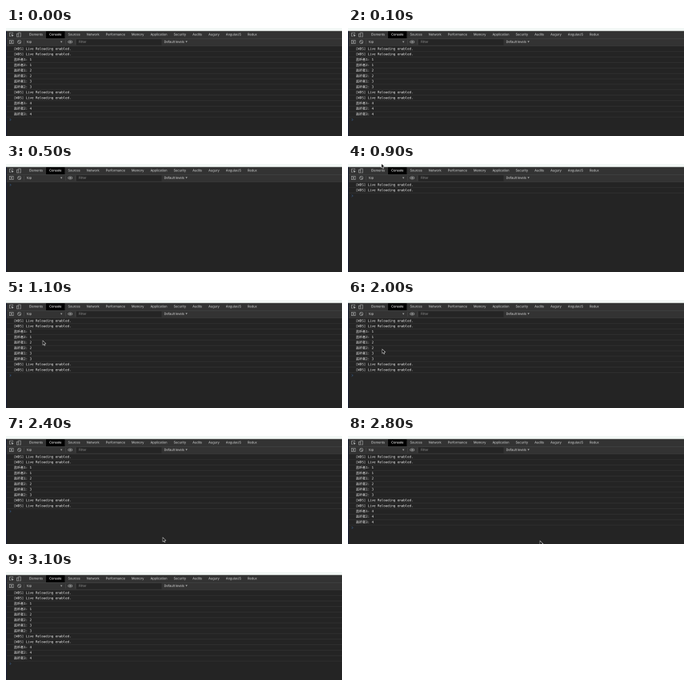
These frames come from a looping animation (420 px wide and 136 px high, 3300 ms). An HTML page with a canvas:

```html
<!DOCTYPE html>
<html lang="zh">
<head>
<meta charset="utf-8">
<title>Console</title>
<style>
  html, body { margin: 0; width: 100%; height: 100%; overflow: hidden; background: #242424; }
  canvas { display: block; width: 420px; height: 136px; }
</style>
</head>
<body>
<canvas id="stage"></canvas>
<script>
const W = 420, H = 136, LOOP = 3300, STEP = 100;
const CLEAR_AT = 500, REFILL_AT = 2700;
const ROW_TOP = 22.9, ROW_H = 6.86;
const UI = '500 3.9px Inter, "Liberation Sans", sans-serif';
const MONO = '4.12px "DejaVu Sans Mono", "Noto Sans CJK SC", "Noto Sans CJK", monospace';
const GRAY = '#adafaf';

// The scene is painted oversized and scaled down, so small text stays smooth.
const OVERSAMPLE = 4;
const ratio = window.devicePixelRatio || 1;
const canvas = document.getElementById('stage');
const screen2d = canvas.getContext('2d');
canvas.width = W * ratio;
canvas.height = H * ratio;
const buffer = document.createElement('canvas');
buffer.width = W * ratio * OVERSAMPLE;
buffer.height = H * ratio * OVERSAMPLE;
const ctx = buffer.getContext('2d');
ctx.scale(ratio * OVERSAMPLE, ratio * OVERSAMPLE);
ctx.textBaseline = 'middle';

const tabs = ['Elements', 'Console', 'Sources', 'Network', 'Performance', 'Memory',
  'Application', 'Security', 'Audits', 'Augury', 'AngularJS', 'Redux'];

const log = [];
const print = (time, string) => log.push({ time, string });
const printHeard = (time, listeners, value) => {
  for (let i = 1; i <= listeners; i++) print(time, `监听者${i}: ${value}`);
};
const printReload = time => print(time, '[WDS] Live Reloading enabled.');
printReload(700);
printReload(800);
for (let value = 1; value <= 3; value++) printHeard(1000, 2, value);
printReload(1000);
printReload(1100);
printHeard(REFILL_AT, 3, 4);

// The pointer glides during `move` and is visible during `show`.
const glides = [
  { show: [900, 1900], move: [900, 1000], from: [41.8, -0.5], to: [46, 51.2] },
  { show: [1900, 2400], move: [1900, 2200], from: [46, 51.2], to: [36.6, 83.4] },
  { show: [2400, 2500], move: [2400, 2500], from: [196, 127.7], to: [196, 127.7] },
  { show: [2800, 3100], move: [2800, 3000], from: [240, 132], to: [391, 129] }
];

function rect(x, y, w, h, color) {
  ctx.fillStyle = color;
  ctx.fillRect(x, y, w, h);
}

function text(string, x, y, color, font = UI) {
  ctx.font = font;
  ctx.fillStyle = color;
  ctx.fillText(string, x, y);
}

function shape(points, { fill, stroke, width = 0.6, closed = true }) {
  ctx.beginPath();
  points.forEach(([x, y]) => ctx.lineTo(x, y));
  if (closed) ctx.closePath();
  paint(fill, stroke, width);
}

function ellipse(x, y, rx, ry, { fill, stroke }) {
  ctx.beginPath();
  ctx.ellipse(x, y, rx, ry, 0, 0, Math.PI * 2);
  paint(fill, stroke, 0.6);
}

function paint(fill, stroke, width) {
  if (fill) {
    ctx.fillStyle = fill;
    ctx.fill();
  }
  if (stroke) {
    ctx.strokeStyle = stroke;
    ctx.lineWidth = width;
    ctx.stroke();
  }
}

function box(x, y, w, h) {
  shape([[x, y], [x + w, y], [x + w, y + h], [x, y + h]], { stroke: GRAY });
}

function dropArrow(x, y) {
  shape([[x, y], [x + 2.4, y], [x + 1.2, y + 2]], { fill: GRAY });
}

function drawTabs() {
  const first = 29, last = 302;
  ctx.font = UI;
  const widths = tabs.map(label => ctx.measureText(label).width);
  const used = widths.slice(0, -1).reduce((sum, width) => sum + width);
  const gap = (last - first - used) / (tabs.length - 1);
  let x = first;
  tabs.forEach((label, i) => {
    const selected = label === 'Console';
    if (selected) rect(x - gap / 2, 4, widths[i] + gap, 9, '#000');
    text(label, x, 8.3, selected ? '#fff' : '#c4c6c6');
    x += widths[i] + gap;
  });
}

function drawIcons() {
  const open = { stroke: GRAY, closed: false };
  shape([[8.6, 7.2], [8.6, 6.1], [4.6, 6.1], [4.6, 10.2], [6, 10.2]], open);
  shape([[6.4, 7.7], [9.6, 9.1], [7.6, 11]], { fill: GRAY });
  box(13.6, 7.2, 2.2, 3.8);
  shape([[14.8, 6], [18.2, 6], [18.2, 11], [16.8, 11]], open);

  box(4.5, 15.3, 4.6, 4.4);
  shape([[6, 16.3], [8.2, 17.5], [6, 18.7]], { fill: GRAY });
  ellipse(16.7, 17.5, 2.1, 2.1, { stroke: GRAY });
  shape([[15.3, 16.1], [18.1, 18.9]], open);
  ellipse(80.3, 17.5, 2.6, 1.6, { stroke: GRAY });
  ellipse(80.3, 17.5, 0.9, 0.9, { fill: GRAY });
}

function drawToolbar() {
  rect(0, 0, W, 3.8, '#f3f8f6');
  rect(0, 3.8, W, 18.5, '#333333');
  rect(0, 13, W, 0.6, '#454646');
  rect(0, 22, W, 0.6, '#424242');
  drawTabs();
  rect(88, 14.2, 106.5, 7.4, '#252525');
  for (const x of [22, 74, 86.5]) rect(x, 14.8, 0.6, 6, '#484848');
  text('top', 26, 17.6, '#cccccc');
  dropArrow(68, 16.6);
  text('Filter', 91, 17.6, '#8c8c8c');
  text('Default levels', 197.6, 17.6, '#cccccc');
  dropArrow(224.4, 16.4);
  drawIcons();
}

function drawLog(time) {
  const lines = log.filter(entry => time < CLEAR_AT || time >= entry.time);
  lines.forEach(({ string }, i) => {
    const y = ROW_TOP + i * ROW_H;
    text(string, 9.8, y + ROW_H / 2, '#f0f0f0', MONO);
    rect(0, y + ROW_H - 0.3, W, 0.6, '#363636');
  });
  const y = ROW_TOP + (lines.length + 0.5) * ROW_H;
  shape([[4.6, y - 1.4], [6.2, y], [4.6, y + 1.4]], { stroke: '#36577f', closed: false });
}

function drawPointer(time) {
  const glide = glides.find(({ show }) => time >= show[0] && time < show[1]);
  if (!glide) return;
  const [begin, end] = glide.move;
  const progress = Math.min(1, (time - begin) / (end - begin));
  const [x, y] = glide.from.map((a, i) => a + (glide.to[i] - a) * progress);
  ctx.save();
  ctx.translate(x, y);
  shape([[0, 0], [0, 5.3], [1.2, 4.3], [2.1, 6.2], [3, 5.8], [2.2, 3.9], [3.8, 3.8]],
    { fill: '#050505', stroke: '#dedede', width: 0.5 });
  ctx.restore();
}

function draw(time) {
  rect(0, 0, W, H, '#242424');
  drawToolbar();
  drawLog(time);
  rect(0, 3.8, 1, H, '#171d31');
  drawPointer(time);
  screen2d.imageSmoothingQuality = 'high';
  screen2d.drawImage(buffer, 0, 0, canvas.width, canvas.height);
}

const start = performance.now();
let drawn = -1;
function tick() {
  const elapsed = (performance.now() - start) % LOOP;
  const time = Math.floor(elapsed / STEP) * STEP;
  if (time !== drawn) draw(drawn = time);
  requestAnimationFrame(tick);
}
tick();
</script>
</body>
</html>
```
